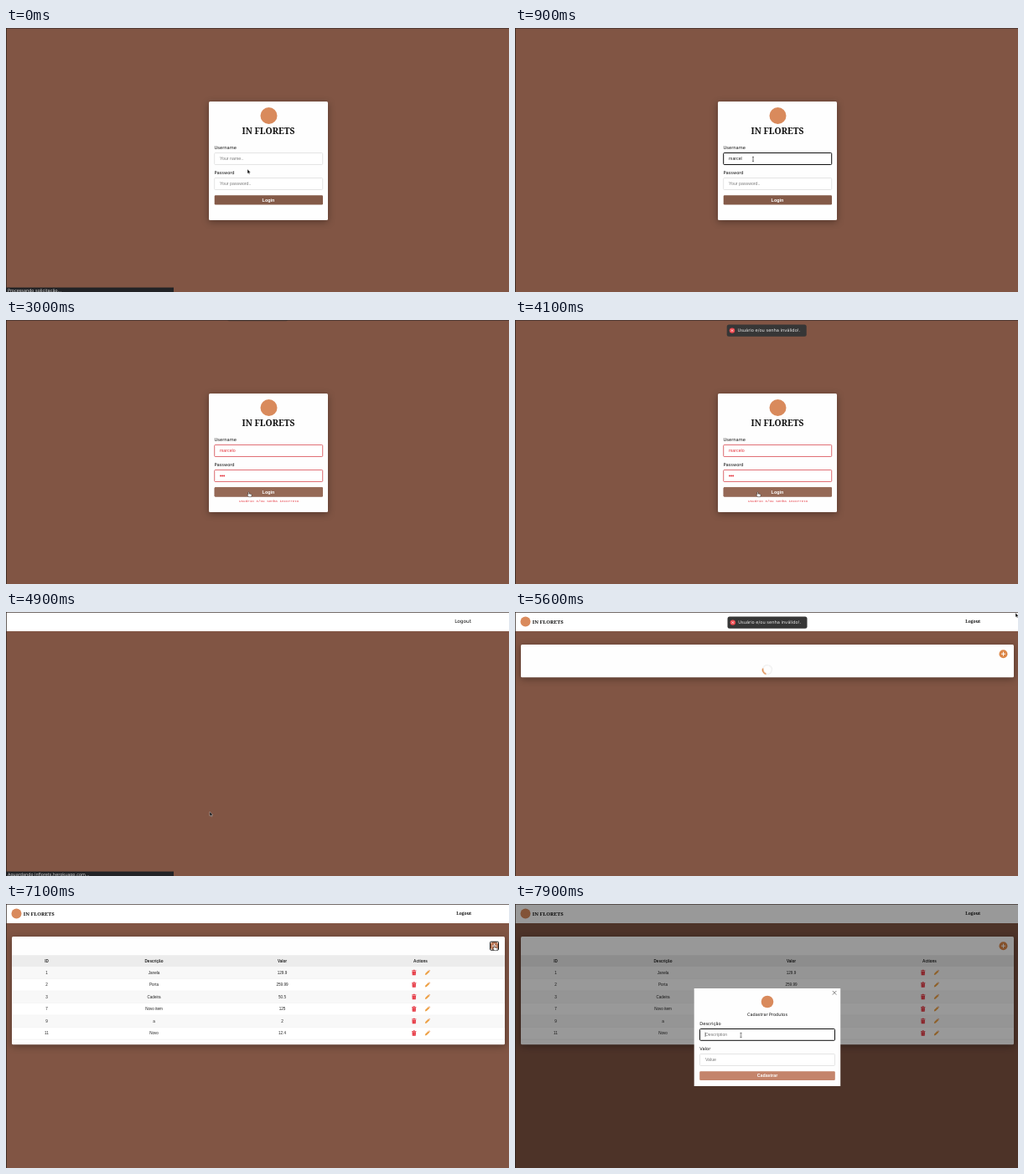
Animation, 600 px wide and 316 px high, one loop 8 s. Source, as an HTML page:

```html
<!DOCTYPE html>
<html lang="pt">
<head>
<meta charset="utf-8">
<title>Login</title>
<style>
html, body { margin: 0; width: 100%; height: 100%; overflow: hidden; background: #815544; }
svg { display: block; width: 100vw; height: 100vh; }
text { font-family: "Liberation Sans", Arial, sans-serif; font-size: 5.25px; fill: #222; }
.sans { font-family: "DejaVu Sans", sans-serif; font-size: 5.15px; fill: #111; }
.serif { font-family: "Noto Serif", serif; font-weight: 700; fill: #111; }
.mid, .table text { text-anchor: middle; }
.hint { fill: #7b7b7b; }
.btn { font-weight: 700; fill: #fff; text-anchor: middle; }
.red { fill: #e5343d; }
.field { fill: #fff; stroke: #d3d3d3; stroke-width: .6; }
.bad { fill: none; stroke: #e0525a; stroke-width: .8; }
.focus { fill: none; stroke: #111; stroke-width: 1; }
.card { fill: #fefefe; filter: drop-shadow(0 2px 4px rgba(0, 0, 0, .35)); }
.logo { fill: #d98a5c; }
.table text { font-size: 4.6px; }
.table .head text { font-weight: 700; }
.status rect { fill: #222326; }
.status text { fill: #d6d6d6; font-size: 5px; }

.toast { transform-box: fill-box; transform-origin: center; }
.toast.first { animation: drop 8s infinite; }
.toast.second { animation: lift 8s infinite; }
@keyframes drop {
  0%, 36.9% { opacity: 0; transform: translateY(-28px) scale(.6); }
  37%  { opacity: .5; transform: translateY(-28px) scale(.6); animation-timing-function: cubic-bezier(.21, 1.02, .73, 1); }
  41.4%, 100% { opacity: 1; transform: none; }
}
@keyframes lift {
  0%, 73.75% { opacity: 1; transform: none; animation-timing-function: cubic-bezier(.06, .71, .55, 1); }
  78.75%, 100% { opacity: 0; transform: translateY(-30px) scale(.6); }
}

.spin { transform-origin: 301px 69px; animation: spin 1s linear infinite; }
@keyframes spin { from { transform: rotate(114deg); } to { transform: rotate(474deg); } }

#cursor { animation: roam 8s ease-in-out infinite; }
@keyframes roam {
  0%, 1.5% { transform: translate(288px, 169px); }
  4.4%, 12% { transform: translate(284px, 157px); }
  14.5%, 18.5% { transform: translate(294px, 187px); }
  21.5%, 23.5% { transform: translate(299px, 204px); }
  26%, 29.5% { transform: translate(293px, 187px); }
  33%, 52% { transform: translate(289px, 206px); }
  56%, 62% { transform: translate(243px, 239px); }
  69.5%, 73% { transform: translate(597px, 1px); }
  84%, 91.5% { transform: translate(582px, 50px); }
  95.5%, 100% { transform: translate(269.5px, 157px); }
}
</style>
</head>
<body>
<svg viewBox="0 0 600 316" preserveAspectRatio="none">
  <defs>
    <g id="note">
      <rect x="252.7" y="5.5" width="95" height="14.2" rx="2.5" fill="#363636"/>
      <circle cx="259" cy="12.6" r="3.2" fill="#f04a50"/>
      <path d="M257.8 11.4l2.4 2.4m0-2.4l-2.4 2.4" stroke="#fff" stroke-width=".7"/>
      <text class="sans" x="265.4" y="14.4" style="fill:#e6e6e6">Usuário e/ou senha inválido!.</text>
    </g>
    <g id="trash" fill="#e5303c">
      <path d="M-2.7-2.7h1.6l.4-.7h1.4l.4.7h1.6v.9h-5.4zM-2.3-1.4h4.6l-.3 4.6h-4z"/>
      <path d="M-.9-.6v3M.9-.6v3" stroke="#f5a0a5" stroke-width=".4"/>
    </g>
    <g id="pencil">
      <path d="M-2.9 2.9l.5-2 3.6-3.6 1.5 1.5-3.6 3.6z" fill="#eda044"/>
      <path d="M1.6-3l.5-.4 1.3 1.3-.5.5z" fill="#e07f4b"/>
    </g>
  </defs>

  <rect width="600" height="316" fill="#815544"/>

  <g data-show="0 4700">
    <rect class="card" x="242" y="88" width="142" height="142" rx="1.5"/>
    <circle class="logo" cx="313.5" cy="105" r="10"/>
    <text class="serif mid" x="313" y="127" style="font-size:10.3px">IN FLORETS</text>

    <text class="sans" x="248.6" y="145">Username</text>
    <rect class="field" x="248.7" y="149.5" width="129" height="14" rx="1"/>
    <text class="hint" x="255" y="158.4" data-show="0 480">Your name..</text>
    <g data-show="0 2900"><text x="255" y="158.4" data-type="480 75">marcelo</text></g>
    <rect class="focus" x="248.7" y="149.5" width="129" height="14" rx="1" data-show="380 1200"/>

    <text class="sans" x="248.6" y="175">Password</text>
    <rect class="field" x="248.7" y="179.5" width="129" height="14" rx="1"/>
    <text class="hint" x="255" y="188.4" data-show="0 1300">Your password..</text>
    <g fill="#222" data-show="0 2900">
      <circle cx="256" cy="186.5" r=".95" data-show="1300 8000"/>
      <circle cx="258.1" cy="186.5" r=".95" data-show="1420 8000"/>
      <circle cx="260.2" cy="186.5" r=".95" data-show="2250 8000"/>
    </g>
    <rect class="focus" x="248.7" y="179.5" width="129" height="14" rx="1" data-show="1200 1700, 2100 2650"/>

    <rect x="248.7" y="200.3" width="129.3" height="11.2" rx="1.3" fill="#845a48"/>
    <rect x="248.7" y="200.3" width="129.3" height="11.2" rx="1.3" fill="#956956" data-show="1640 1930, 2540 4250"/>
    <text class="btn" x="313" y="207.8" style="font-size:5.5px">Login</text>

    <g data-show="2900 4700">
      <rect class="bad" x="248.7" y="149.5" width="129" height="14" rx="1"/>
      <rect class="bad" x="248.7" y="179.5" width="129" height="14" rx="1"/>
      <text class="red" x="255" y="158.4">marcelo</text>
      <g class="red">
        <circle cx="256" cy="186.5" r=".95"/>
        <circle cx="258.1" cy="186.5" r=".95"/>
        <circle cx="260.2" cy="186.5" r=".95"/>
      </g>
      <text class="red mid" x="313.7" y="218.3" style="font:4.25px 'Liberation Mono',monospace">Usuário e/ou Senha incorreto</text>
    </g>
    <g class="toast first"><use href="#note"/></g>
  </g>

  <g data-show="4700 8000">
    <rect width="600" height="23" fill="#fff"/>
    <text class="sans" x="535.2" y="13.2" style="font-size:5.8px" data-show="4700 5200">Logout</text>
    <g data-show="5200 8000">
      <circle class="logo" cx="12.5" cy="11.6" r="6"/>
      <text class="serif" x="20.8" y="13.8" style="font-size:6.05px">IN FLORETS</text>
      <text class="serif" x="537.3" y="13.4" style="font-size:5.1px">Logout</text>

      <g data-show="5200 5900">
        <rect class="card" x="7" y="39" width="588" height="39.3" rx="1.5"/>
        <g class="spin" fill="none">
          <circle cx="301" cy="69" r="5.5" stroke="#e6e6e6" stroke-width=".8"/>
          <path d="M297.1 72.9a5.5 5.5 0 0 1 0-7.8" stroke="#dc8748" stroke-width="1.5"/>
        </g>
      </g>
      <g class="table" data-show="5900 8000">
        <rect class="card" x="7" y="39" width="588" height="129.3" rx="1.5"/>
        <rect x="7" y="61.3" width="588" height="14" fill="#ececec"/>
        <g class="head">
          <text x="48.5" y="70.1">ID</text>
          <text x="176.5" y="70.1">Descrição</text>
          <text x="329.5" y="70.1">Valor</text>
          <text x="494.5" y="70.1">Actions</text>
        </g>
        <g id="rows"></g>
      </g>

      <circle cx="582.5" cy="50.2" r="5" fill="#dc8748"/>
      <g data-show="6750 7600">
        <circle cx="582.5" cy="50.2" r="5" fill="#b9795a"/>
        <rect class="focus" x="577.5" y="45.2" width="10" height="10" rx="1" data-show="6950 8000"/>
      </g>
      <path d="M580 50.2h5m-2.5-2.5v5" stroke="#fff" stroke-width="1"/>
      <g class="toast second"><use href="#note" x=".8"/></g>
    </g>
  </g>

  <g data-show="7180 8000">
    <rect width="600" height="316" opacity=".4"/>
    <rect x="213.7" y="101" width="174.5" height="117" fill="#fefefe"/>
    <path d="M378.8 104l4.6 4.6m0-4.6l-4.6 4.6" stroke="#777" stroke-width=".9"/>
    <circle class="logo" cx="301" cy="117" r="7.3"/>
    <text class="sans mid" x="301" y="133.6" style="font-size:5px">Cadastrar Produtos</text>
    <text class="sans" x="220.3" y="145">Descrição</text>
    <rect class="field" x="220.5" y="149.5" width="161" height="14" rx="1"/>
    <text class="hint" x="227" y="158.2">Description</text>
    <g data-show="7650 8000">
      <rect class="focus" x="220.5" y="149.5" width="161" height="13.8" rx="1"/>
      <path d="M227 153.6v5.4" stroke="#111" stroke-width=".5"/>
    </g>
    <text class="sans" x="220.3" y="175">Valor</text>
    <rect class="field" x="220.5" y="179.5" width="161" height="14" rx="1"/>
    <text class="hint" x="227" y="188.2">Value</text>
    <rect x="220.2" y="200.2" width="161.6" height="10.8" rx="1.3" fill="#c4846b"/>
    <text class="btn" x="301" y="207.3">Cadastrar</text>
  </g>

  <path d="M0 .4h600" stroke="#3c302c" stroke-width=".8"/>
  <path d="M.4 0v316" stroke="#2b211e" stroke-width=".8"/>

  <g class="status" data-show="0 350, 4620 5200">
    <rect y="310.6" width="200" height="5.4"/>
    <text class="sans" x="2" y="315.6" data-show="0 350">Processando solicitação...</text>
    <text class="sans" x="2" y="315.6" data-show="4620 5200">Aguardando inflorets.herokuapp.com...</text>
  </g>

  <g id="cursor">
    <path d="M0 0v5.2l1.2-1 .8 1.8.9-.4-.8-1.7h1.6z" fill="#111" stroke="#eee" stroke-width=".35"
      data-show="0 250, 1000 1080, 1560 1640, 1930 2000, 2440 2540, 4250 6650, 7350 7600"/>
    <path d="M0 0q.8-.6 1 .3v1.7l2.4.5q.9.3.7 1.2l-.5 2h-3l-1.9-2.4q.1-.8 1.3-.1z" fill="#fff" stroke="#222" stroke-width=".45"
      data-show="1640 1930, 2540 4250, 6650 7350"/>
    <path d="M-1-2.8q1 0 1 .6 0-.6 1-.6M0-2.2v4.4M-1 2.8q1 0 1-.6 0 .6 1 .6" fill="none" stroke="#111" stroke-width=".6"
      data-show="250 1000, 1080 1560, 2000 2440, 7600 8000"/>
  </g>
</svg>
<script>
const LOOP = 8000;

const items = [
  [1, 'Janela', 129.9], [2, 'Porta', 259.99], [3, 'Cadeira', 50.5],
  [7, 'Novo item', 125], [9, 'a', 2], [11, 'Novo', 12.4]
];
const columns = [48.5, 176.5, 329.5];

document.getElementById('rows').innerHTML = items.map((item, i) => {
  const top = 75.3 + i * 14.5;
  const cells = item.map((value, c) => `<text x="${columns[c]}" y="${top + 8.6}">${value}</text>`).join('');
  return `<rect x="7" y="${top}" width="588" height="14.5" fill="${i % 2 ? '#fff' : '#f8f8f8'}"/>
    <path d="M7 ${top + 14.4}h588" stroke="#e6e6e6" stroke-width=".5"/>${cells}
    <use href="#trash" x="486.7" y="${top + 6.8}"/><use href="#pencil" x="502.7" y="${top + 6.8}"/>`;
}).join('');

// Makes an element visible only inside the given [start, end] spans.
function show(el, spans, prop = 'opacity') {
  const key = (value, ms) => ({ [prop]: value, offset: ms / LOOP, easing: 'step-end' });
  const frames = [key(0, 0)];
  for (const [start, end] of spans) frames.push(key(1, start), key(end < LOOP ? 0 : 1, end));
  if (spans.at(-1)[1] < LOOP) frames.push(key(0, LOOP));
  el.animate(frames, { duration: LOOP, iterations: Infinity });
}

for (const el of document.querySelectorAll('[data-show]'))
  show(el, el.dataset.show.split(',').map(span => span.trim().split(' ').map(Number)));

for (const el of document.querySelectorAll('[data-type]')) {
  const [start, step] = el.dataset.type.split(' ').map(Number);
  el.innerHTML = [...el.textContent].map(ch => `<tspan>${ch}</tspan>`).join('');
  [...el.children].forEach((ch, i) => show(ch, [[start + i * step, LOOP]], 'fillOpacity'));
}
</script>
</body>
</html>
```
